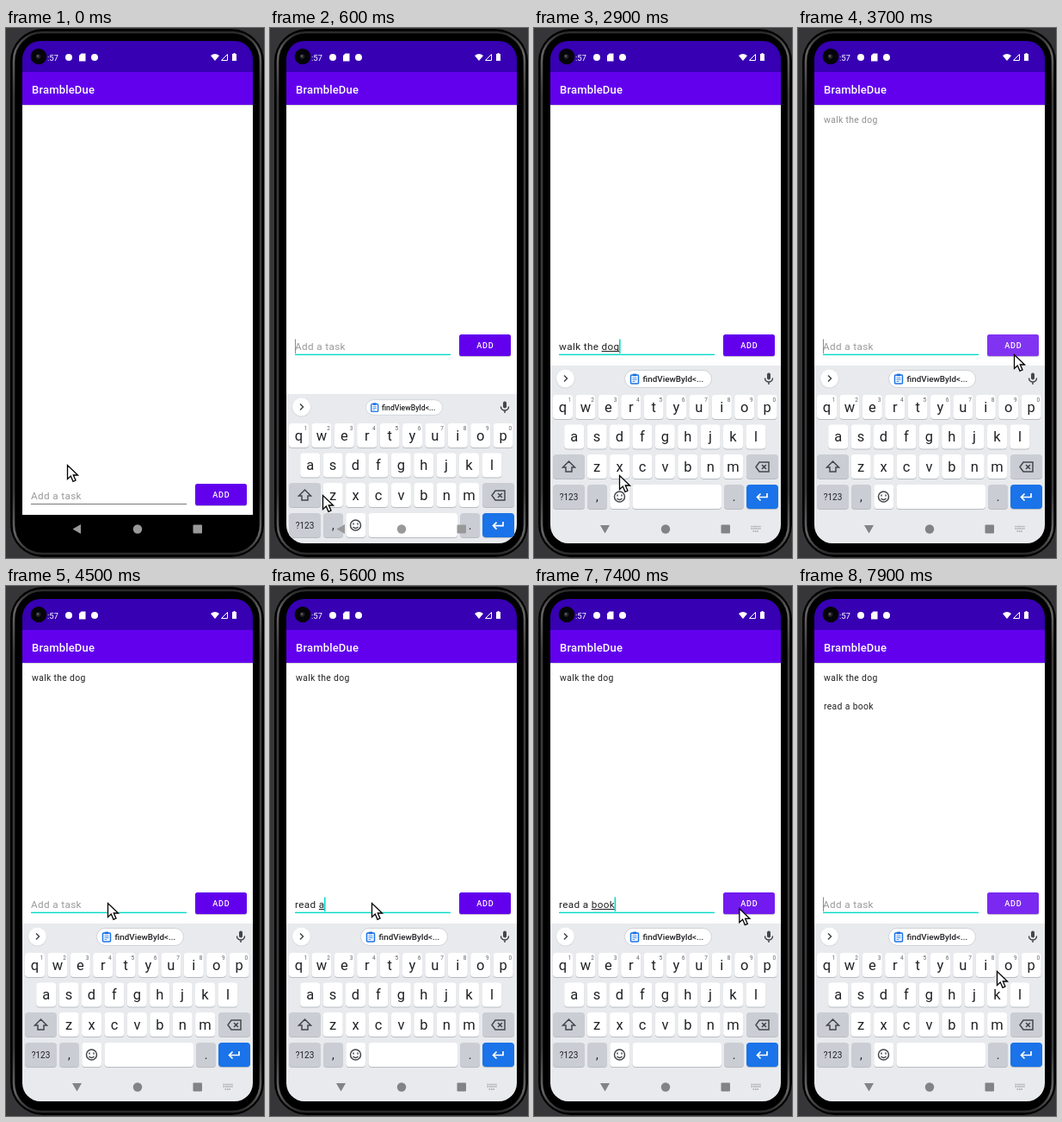
Write an HTML page that moves like this. It is 300 px wide and 614 px high and loops after 8000 ms.

```html
<!DOCTYPE html>
<html lang="en">
<head>
<meta charset="utf-8">
<title>To-do app</title>
<style>
  html, body { margin: 0; width: 100%; height: 100%; overflow: hidden; background: #363638; }
  svg { display: block; width: 300px; height: 614px; font-family: Roboto, sans-serif; }
  text { white-space: pre; }
  .mid { text-anchor: middle; }
  .medium { font-weight: 500; }
  .task { font-size: 10.43px; letter-spacing: .03125em; fill: #212121; }
  .field { font-size: 11.73px; letter-spacing: .03125em; }
  .line { fill: none; stroke: #44474a; stroke-width: 1.5; }
</style>
</head>
<body>
<svg viewBox="0 0 300 614">
  <defs>
    <clipPath id="screen"><rect x="19" y="15" width="268" height="582" rx="21"/></clipPath>
    <linearGradient id="rim" x2="0" y2="1">
      <stop offset="0" stop-color="#2a2a2a"/>
      <stop offset=".04" stop-color="#666"/>
      <stop offset=".12" stop-color="#3a3a3a"/>
      <stop offset=".88" stop-color="#3a3a3a"/>
      <stop offset=".96" stop-color="#666"/>
      <stop offset="1" stop-color="#2a2a2a"/>
    </linearGradient>
  </defs>
  <rect width="300" height="614" fill="#363638"/>
  <rect x="5" y="1" width="295" height="612" rx="38"/>
  <rect x="9" y="5" width="287" height="604" rx="33" stroke="url(#rim)" stroke-width="2.600"/>

  <g clip-path="url(#screen)">
    <rect x="19" y="15" width="268" height="36" fill="#3700b3"/>
    <rect x="19" y="51" width="268" height="38" fill="#6200ee"/>
    <rect x="19" y="89" width="268" height="475" fill="#fff"/>
    <rect x="19" y="89" width="268" height="1" fill="#000" opacity=".16"/>
    <text x="30" y="76" font-size="13.04" letter-spacing=".16" class="medium" fill="#fff">BrambleDue</text>

    <g fill="#fff">
      <text x="61" y="37.5" font-size="9.6" text-anchor="end">1:57</text>
      <circle cx="73" cy="34" r="4"/>
      <path d="M85 32l2.5-2.5H92.500V38.500H85Z"/>
      <circle cx="103" cy="34" r="4"/>
      <path d="M238 32Q243 28 248 32L243 38Z"/>
      <path d="M250.500 37.500L257.500 30.500V37.500Z" fill="none" stroke="#fff"/>
      <path d="M263 30h1.500v-1h2v1H268V38H263Z"/>
    </g>
    <circle cx="38" cy="33" r="9.300" fill="#050508"/>
    <circle cx="37.500" cy="33" r="2.800" fill="#24242a"/>
    <circle cx="37" cy="32.500" r="1" fill="#777"/>

    <text id="task0" class="task" x="30" y="110">walk the dog</text>
    <text id="task1" class="task" x="30" y="143">read a book</text>

    <g id="form">
      <text id="entry" class="field" x="29" y="373"></text>
      <rect id="composing" x="29" y="374" height="1" fill="#212121"/>
      <rect id="rule" x="29" width="181"/>
      <rect id="caret" y="360.500" height="16.500"/>
      <rect x="220" y="356" width="60" height="25" rx="2.500" fill="#c4bccf"/>
      <rect x="220" y="355" width="60" height="25" rx="2.500" fill="#6200ee"/>
      <rect id="ripple" x="220" y="355" width="60" height="25" rx="2.500" fill="#fff"/>
      <text x="250.400" y="371" class="mid medium" font-size="9.130" letter-spacing=".81" fill="#fff">ADD</text>
    </g>

    <g id="keyboard">
      <rect x="19" y="391" width="268" height="210" fill="#e8eaed"/>
      <circle cx="36.500" cy="406.500" r="11" fill="#d3d6da"/>
      <circle cx="36.500" cy="406" r="10.500" fill="#fff"/>
      <path class="line" d="M35 402.500l3.500 3.500l-3.500 3.500"/>
      <g id="chip">
        <rect x="105.500" y="396.500" width="101" height="20" rx="10" fill="#fff" stroke="#d0d3d8"/>
        <rect x="112.500" y="402" width="9" height="10" rx="1" fill="#fff" stroke="#1a73e8" stroke-width="1.500"/>
        <path d="M115 401h4v2h-4zM114.500 405.500h5M114.500 407.500h5M114.500 409.500h3" fill="#1a73e8" stroke="#1a73e8" stroke-width=".8"/>
        <text x="126.500" y="410" font-size="9.850" class="medium" fill="#202124">findViewById&lt;...</text>
      </g>
      <rect x="271" y="399.500" width="4" height="8" rx="2" fill="#44474a"/>
      <path class="line" d="M268.500 405.500a4.500 4.500 0 0 0 9 0M273 410v3"/>
      <g id="keys"></g>
      <path class="line" d="M40.500 502l7 7h-3.500v5h-7v-5h-3.500z"/>
      <path class="line" d="M262 503h11v11H262l-4-5.500zM265 506l5 5M270 506l-5 5"/>
      <circle class="line" cx="99.500" cy="543" r="6"/>
      <path class="line" d="M96.500 545q3 3 6 0M97 540.500v2M102 540.500v2"/>
      <path d="M271 539v4.500H260M263.500 539.500l-4 4l4 4" fill="none" stroke="#fff" stroke-width="1.700"/>
    </g>

    <g id="nav">
      <path id="back" d="M77.500 580.500l9.500-5.500v11z"/>
      <circle cx="153" cy="580.500" r="5.200"/>
      <rect x="217.500" y="575.500" width="10.500" height="10" rx="1"/>
      <path id="switcher" d="M252.500 577.500h11M252.500 580h11M254.500 583h7" fill="none" stroke="#a3a6aa" stroke-width="1.600" stroke-dasharray="1.600 .8"/>
    </g>
  </g>
  <path id="mouse" d="M.5.5V16.500L4.300 13L7 19.300L10 18L7.300 12H12.500Z" fill="#fff" stroke="#000" stroke-width="1.300"/>
</svg>

<script>
const LOOP = 8000, STEP = 100;
const FIELD_X = 29;
const $ = id => document.getElementById(id);
const clamp = v => Math.max(0, Math.min(1, v));
const progress = (t, from, to) => clamp((t - from) / (to - from));
const set = (id, attrs) => {
  for (const name in attrs) $(id).setAttribute(name, attrs[name]);
};

// Keyboard keys
const PITCH = 26.4, GRAY = '#caced4';

function key(x, y, label, { width = 23, fill = '#fff', size = 16.5, hint = '' } = {}) {
  const box = (dy, color) =>
    `<rect x="${x}" y="${y + dy}" width="${width}" height="28" rx="4" fill="${color}"/>`;
  return box(1, '#b8bcc1') + box(0, fill) +
    `<text class="mid" x="${x + width / 2}" y="${y + 14.8 + size * .29}" font-size="${size}" fill="#202124">${label}</text>` +
    `<text class="mid" x="${x + 19.7}" y="${y + 7.5}" font-size="6.5" fill="#5f6368">${hint}</text>`;
}

const row = (letters, x, y, hints = '') =>
  [...letters].map((c, i) => key(x + i * PITCH, y, c, { hint: hints[i] || '' })).join('');

const wide = { width: 37, fill: GRAY };
$('keys').innerHTML =
  row('qwertyuiop', 22, 425, '1234567890') +
  row('asdfghjkl', 35.2, 459.5) +
  key(22, 494, '', wide) + row('zxcvbnm', 61.7, 494) + key(247, 494, '', wide) +
  key(22, 529, '?123', { ...wide, size: 10 }) +
  key(62, 529, ',', { fill: GRAY, size: 14 }) +
  key(88.3, 529, '') +
  key(114.5, 529, '', { width: 103.5 }) +
  key(221, 529, '.', { fill: GRAY, size: 14 }) +
  key(247, 529, '', { width: 37, fill: '#1a73e8' });

// Timeline
const run = (from, count) => Array.from({ length: count }, (_, i) => from + i * 100);
const tasks = [
  { text: 'walk the dog', strokes: [1000, 1100, 1300, 1500, ...run(1700, 8)], click: 3500 },
  { text: 'read a book', strokes: [4900, 5100, ...run(5300, 8), 6200], click: 7400 },
];
const mousePath = [
  [0, 71, 506], [300, 61, 541], [2700, 61, 541], [2900, 99, 518], [3400, 251, 372],
  [3700, 251, 378], [3900, 245, 387], [4500, 118, 367], [6600, 118, 367],
  [6700, 134, 365], [7200, 237, 372], [7500, 239, 374], [7900, 231, 446],
];

function mouseAt(t) {
  const next = Math.max(1, mousePath.findIndex(p => p[0] >= t));
  const [t0, x0, y0] = mousePath[next - 1], [t1, x1, y1] = mousePath[next];
  const p = progress(t, t0, t1);
  return [x0 + (x1 - x0) * p, y0 + (y1 - y0) * p];
}

function textWidth(text) {
  $('entry').textContent = text;
  return text ? $('entry').getComputedTextLength() : 0;
}

function drawEntry(t, focused) {
  const task = tasks.find(k => t >= k.strokes[0] && t < k.click + 100);
  const typed = task ? task.text.slice(0, task.strokes.filter(s => s <= t).length) : '';
  const finishing = task && typed === task.text && t < task.strokes.at(-1) + 200;
  const start = textWidth(typed.slice(0, typed.lastIndexOf(' ') + 1));
  const marked = textWidth(finishing ? typed.slice(0, -1) : typed);
  const end = textWidth(typed);
  const blinkOff = t >= 4200 && t < 4700;

  $('entry').textContent = typed || 'Add a task';
  set('entry', { fill: typed ? '#212121' : '#999' });
  set('composing', { x: FIELD_X + start, width: Math.max(0, marked - start) });
  set('caret', {
    x: FIELD_X + (typed ? end - .6 : 0), width: typed ? 1.6 : 1,
    fill: typed ? '#03dac5' : '#7f8f8f',
    opacity: focused && !blinkOff ? 1 : 0,
  });
}

function draw(t) {
  const focused = t >= 300, resized = t >= 400, settled = t >= 700;
  drawEntry(t, focused);
  set('form', { transform: `translate(0 ${resized ? 0 : 173})` });
  set('rule', focused
    ? { y: 377.7, height: 1.4, fill: '#03dac5' }
    : { y: 378, height: 1, fill: '#777' });

  const hidden = Math.pow(1 - progress(t, 400, 800), 2.64);
  const chipScale = t < 600 ? .8 : settled ? 1 : .88;
  set('keyboard', { transform: `translate(0 ${206 * hidden})` });
  set('chip', { transform: `translate(156 406.5) scale(${chipScale}) translate(-156 -406.5)` });
  set('nav', { fill: settled ? '#808387' : '#999' });
  set('back', { transform: `rotate(${-90 * progress(t, 600, 800)} 82.5 580.5)` });
  set('switcher', { opacity: settled ? 1 : 0 });

  let glow = 0;
  tasks.forEach(({ click }, i) => {
    set('task' + i, { opacity: progress(t, click + 100, click + 300) });
    glow += .2 * progress(t, click - 100, click + 100) * (1 - progress(t, click + 400, click + 900));
  });
  set('ripple', { opacity: glow });
  set('mouse', { transform: `translate(${mouseAt(t)})` });
}

function frame(now) {
  draw(Math.floor(now % LOOP / STEP) * STEP);
  requestAnimationFrame(frame);
}
requestAnimationFrame(frame);
</script>
</body>
</html>
```
